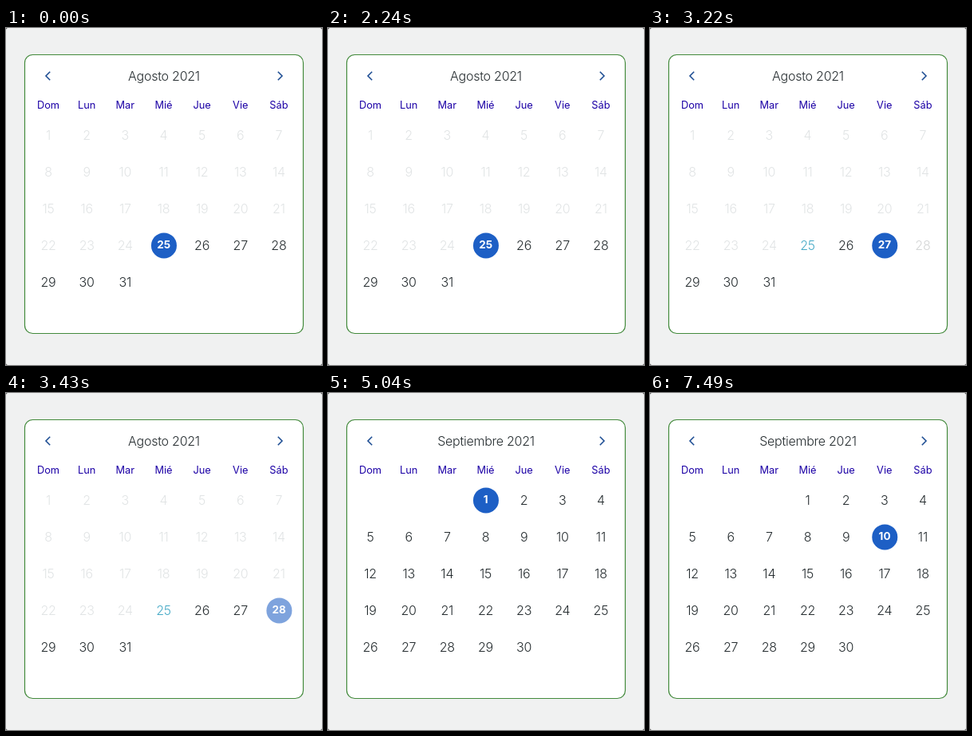
An HTML page for the animation above (8000 ms loop, 396 px wide and 422 px high).

```html
<!DOCTYPE html>
<html lang="es">
<head>
<meta charset="utf-8">
<title>Calendario</title>
<style>
  html, body { margin: 0; width: 100%; height: 100%; overflow: hidden; background: #444; }
  svg { display: block; width: 396px; height: 422px; }
  text { font-family: Inter, "Open Sans", sans-serif; text-anchor: middle; }
  .title, .day { font-size: 16px; font-weight: 300; letter-spacing: -.25px; fill: #262d30; }
  .week { font-size: 12.8px; font-weight: 400; fill: #1c00a6; }
  .past { fill: #e1e4e5; }
  .today { fill: #45a9c6; }
  .picked { font-size: 13.5px; font-weight: 700; letter-spacing: 0; fill: #fff; }
  .disc { fill: #1d5fc5; }
  .arrow { fill: none; stroke: #1f4f94; stroke-width: 1.6; }
</style>
</head>
<body>
<svg id="stage" viewBox="0 0 396 422">
  <rect width="396" height="422" rx="2.5" fill="#f0f1f1"/>
  <rect x="23.5" y="33.5" width="349" height="349" rx="10" fill="#fff" stroke="#438a3c" stroke-width="1.2"/>
  <path class="arrow" d="M55.2 54.8 L50 60 L55.2 65.2"/>
  <path class="arrow" id="next" d="M340.8 54.8 L346 60 L340.8 65.2"/>
</svg>
<script>
const LOOP = 8000, STEP = 70, FADE = 250, DIM = 0.2;
const stage = document.getElementById('stage');
const next = document.getElementById('next');

const months = [
  { title: 'Agosto 2021', first: 0, days: 31, today: 25 },
  { title: 'Septiembre 2021', first: 3, days: 30, today: 0 }
];
const MONTH_AT = 4760;

const taps = [
  { month: 0, day: 27, down: 2310, up: 2385 },
  { month: 0, day: 28, down: 3220, up: 3310 },
  { month: 1, day: 10, down: 7140, up: 7210 }
];
const nextTap = { down: 4620, up: 4745 };

function add(parent, tag, attrs, label) {
  const el = document.createElementNS('http://www.w3.org/2000/svg', tag);
  for (const name in attrs) el.setAttribute(name, attrs[name]);
  if (label !== undefined) el.textContent = label;
  parent.appendChild(el);
  return el;
}

const colX = col => 53 + 48.15 * col;

['Dom', 'Lun', 'Mar', 'Mié', 'Jue', 'Vie', 'Sáb'].forEach((name, col) =>
  add(stage, 'text', { class: 'week', x: colX(col), y: 101.2 }, name));

for (const month of months) {
  month.group = add(stage, 'g', {});
  add(month.group, 'text', { class: 'title', x: 198, y: 65.8 }, month.title);
  month.cells = [];
  for (let day = 1; day <= month.days; day++) {
    const slot = month.first + day - 1;
    const x = colX(slot % 7), y = 134 + 46 * Math.floor(slot / 7);
    const cell = add(month.group, 'g', {});
    const style = day < month.today ? ' past' : day === month.today ? ' today' : '';
    const plain = add(cell, 'text', { class: 'day' + style, x, y: y + 6 }, day);
    const badge = add(cell, 'g', {});
    add(badge, 'circle', { class: 'disc', cx: x + 0.5, cy: y + 0.4, r: 16 });
    add(badge, 'text', { class: 'picked', x: x + 0.3, y: y + 3.8 }, day);
    month.cells.push({ day, cell, plain, badge });
  }
}

const ease = p => p < 0.5 ? 2 * p * p : 1 - 2 * (1 - p) * (1 - p);

// Dims at once on press, eases back after release.
function touchOpacity(tap, t) {
  if (!tap || t < tap.down) return 1;
  const p = Math.min(1, Math.max(0, (t - tap.up) / FADE));
  return DIM + (1 - DIM) * ease(p);
}

function selectedDay(index, t) {
  let day = index ? 1 : 25;
  for (const tap of taps)
    if (tap.month === index && t >= tap.up) day = tap.day;
  return day;
}

const show = (el, on) => el.setAttribute('display', on ? 'inline' : 'none');

function render(t) {
  const current = t < MONTH_AT ? 0 : 1;
  const picked = selectedDay(current, t);
  months.forEach((month, i) => show(month.group, i === current));
  for (const { day, cell, plain, badge } of months[current].cells) {
    const tap = taps.find(p => p.month === current && p.day === day);
    show(plain, day !== picked);
    show(badge, day === picked);
    cell.setAttribute('opacity', touchOpacity(tap, t));
  }
  next.setAttribute('opacity', touchOpacity(nextTap, t));
}

const start = performance.now();
function tick() {
  const t = (performance.now() - start) % LOOP;
  render(t - t % STEP);
  requestAnimationFrame(tick);
}
tick();
</script>
</body>
</html>
```
